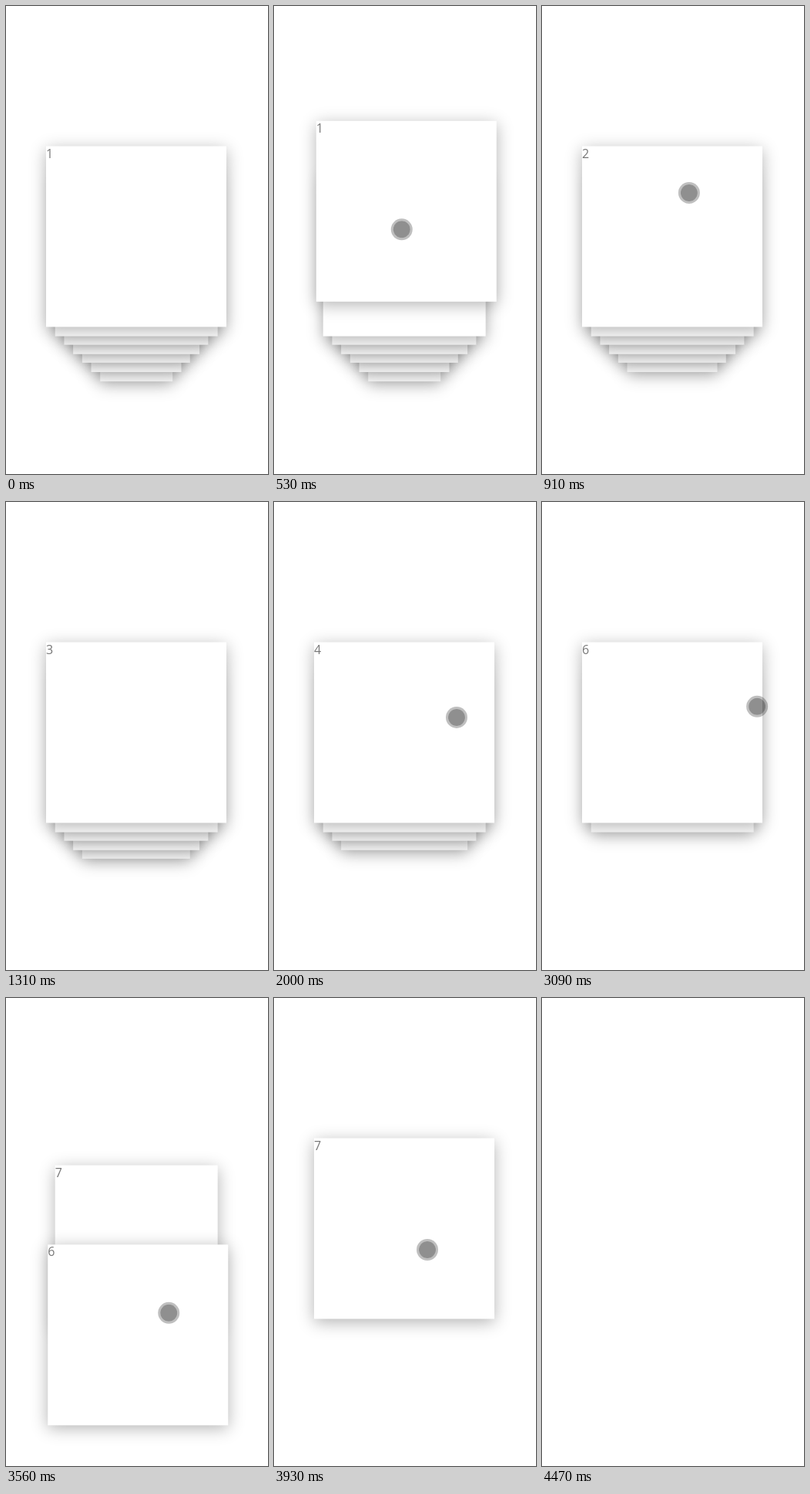
Write an HTML page that moves like this. It is 340 px wide and 606 px high and loops after 5100 ms.

```html
<!DOCTYPE html>
<html lang="en">
<head>
<meta charset="utf-8">
<title>Card stack</title>
<style>
html, body { margin: 0; width: 100%; height: 100%; overflow: hidden; background: #fff; }
.card {
  position: absolute; left: 0; top: 0;
  background: #fff; color: #777; font: 16px/18px "Open Sans", sans-serif;
  box-shadow: 0 4px 20px rgba(0, 0, 0, .3);
}
#touch {
  position: absolute; left: -14px; top: -14px; width: 22px; height: 22px;
  border: 3px solid rgba(0, 0, 0, .25); border-radius: 50%;
  background: rgba(0, 0, 0, .44); background-clip: padding-box; z-index: 9;
}
</style>
</head>
<body>
<div id="touch"></div>
<script>
const LOOP = 5100, TICK = 77.2, SIZE = 234, CENTER = [169, 298.5];

// The pointer comes from a point, grabs the card at another and flings it.
// It approaches for `steps` ticks, drags for as many, and the card is gone at tick `end`.
const swipe = (end, steps, from, at, fling) => ({ end, steps, from, at, fling });
const QUICK = 2, SLOW = 4;
const swipes = [
  swipe(10, SLOW, [216, 434], [163, 322], [44, -523]),
  swipe(15, QUICK, [198, 154], [187, 290], [-640, -304]),
  swipe(23, QUICK, [90, 300], [130, 260], [148, -48]),
  swipe(29, QUICK, [279, 266], [214, 286], [-384, 96]),
  swipe(35, QUICK, [600, 290], [175, 290], [1000, -156]),
  swipe(47, SLOW, [317, 262], [209, 270], [4, 245]),
  swipe(53, QUICK, [201, 552], [199, 326], [-108, 0])
];

const touch = document.getElementById('touch');
const cards = swipes.map((_, i) => {
  const card = document.createElement('div');
  card.className = 'card';
  card.textContent = i + 1;
  card.style.zIndex = swipes.length - i;
  document.body.append(card);
  return card;
});

const move = (el, x, y) => el.style.transform = `translate(${x}px, ${y}px)`;
const show = (el, on) => el.style.display = on ? '' : 'none';
const clamp = v => Math.min(1, Math.max(0, v));

function draw(ms) {
  const k = Math.floor((ms % LOOP + 17) / TICK);
  const gone = swipes.filter(s => k >= s.end).length;
  const lag = gone ? Math.max(0, 0.4 - 0.3 * (k - swipes[gone - 1].end)) : 0;

  let drag = [0, 0];
  const s = swipes[gone];
  const near = s ? (k - s.end) / s.steps + 2 : -1;
  show(touch, near >= 0);
  if (near >= 0) {
    const away = (1 - clamp(near)) ** 1.5;
    drag = s.fling.map(v => v * clamp(near - 1) ** 2);
    move(touch, ...s.at.map((v, i) => v + (s.from[i] - v) * away + drag[i]));
  }

  cards.forEach((card, i) => {
    show(card, i >= gone);
    const rank = i - gone + lag, size = SIZE * (1 - rank / 10);
    const [dx, dy] = i === gone ? drag : [0, 0];
    card.style.width = card.style.height = size + 'px';
    move(card, CENTER[0] - size / 2 + dx, CENTER[1] - size / 2 + rank * SIZE / 10 + dy);
  });
}

let start;
function loop(now) {
  start ??= now;
  draw(now - start);
  requestAnimationFrame(loop);
}
draw(0);
requestAnimationFrame(loop);
</script>
</body>
</html>
```
